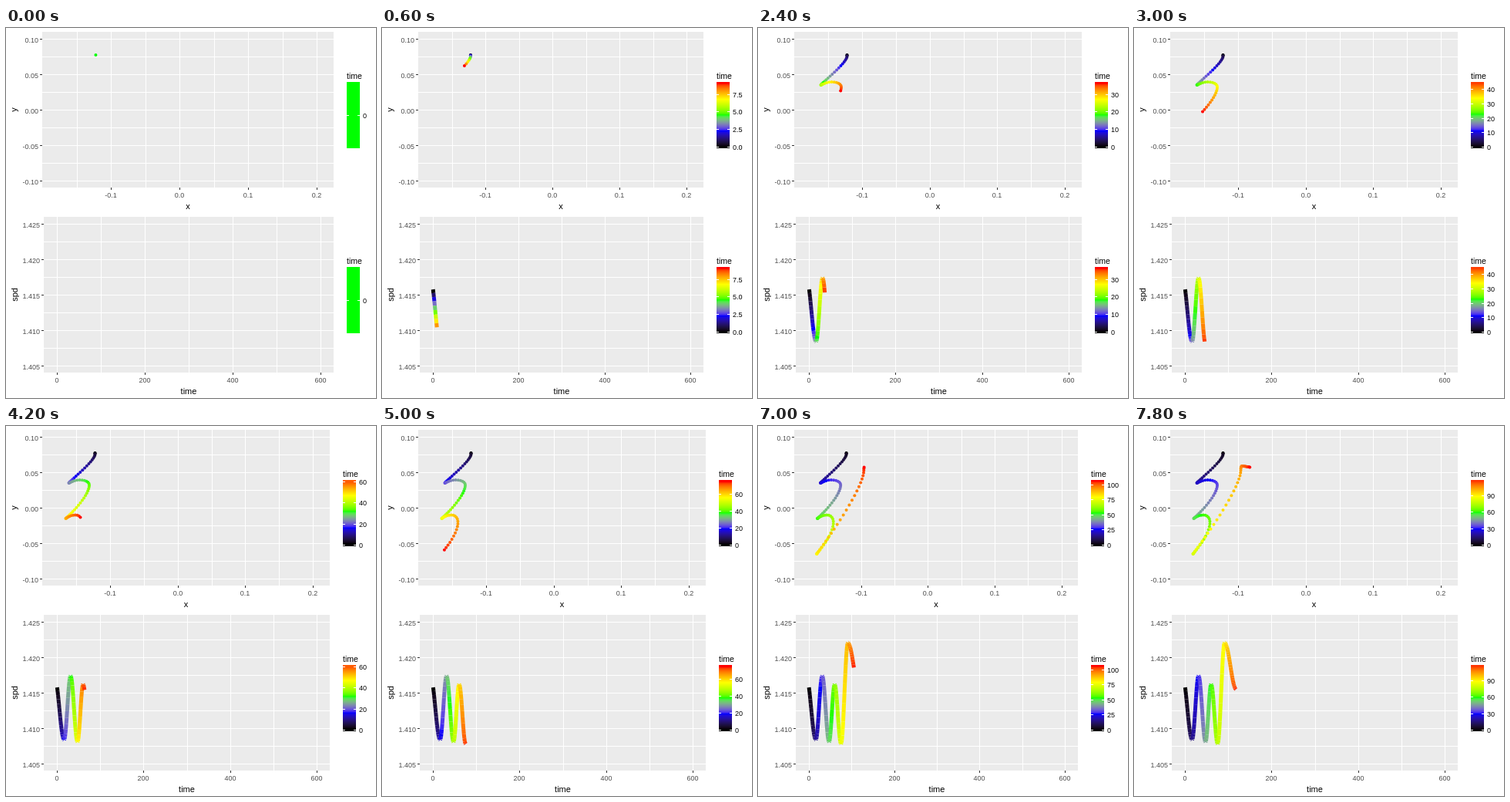
Animation, 480 px wide and 480 px high, one loop 8 s. Source, as an HTML page with a canvas:

```html
<!DOCTYPE html>
<html lang="en">
<head>
<meta charset="utf-8">
<title>Path and speed over time</title>
<style>
  html, body { margin: 0; width: 100%; height: 100%; overflow: hidden; background: #fff; }
  canvas { display: block; width: 100vw; height: 100vh; }
</style>
</head>
<body>
<canvas id="stage" width="480" height="480"></canvas>
<script>
const ctx = document.getElementById('stage').getContext('2d');
const FONT = '"Liberation Sans", Arial, sans-serif';
const STEP_MS = 200, STEPS = 40, TIME_PER_STEP = 3;

// Turning points as [time, pixel]; x is measured in a 373 px wide panel at x = 47.
const X_TURNS = [[3, 115], [21.5, 81], [34, 107.5], [53, 77], [65.5, 98], [79, 76], [103, 138], [122, 152]];
const Y_TURNS = [[0, 35], [22, 74], [28, 70], [53, 120], [60, 115.5], [79, 166], [107, 52], [122, 54]];
const SPEED_TURNS = [[-6, 325], [16, 407], [31, 324], [47, 410], [60, 335], [75, 412.5], [91, 281], [118, 342]];

const clamp = (v, low, high) => Math.min(high, Math.max(low, v));

// Half a cosine wave from each turning point to the next.
function swing(turns, t) {
  const i = Math.max(1, turns.findIndex(([time]) => time >= t));
  const [[t0, v0], [t1, v1]] = [turns[i - 1], turns[i]];
  const u = clamp((t - t0) / (t1 - t0), 0, 1);
  return v0 + (v1 - v0) * (1 - Math.cos(Math.PI * u)) / 2;
}

// Black, blue, green, yellow, red in CIE Lab.
const LAB = [[0, 0, 0], [32.3, 79.2, -107.9], [87.7, -86.2, 83.2], [97.1, -21.6, 94.5], [53.2, 80.1, 67.2]];

function colour(u) {
  const i = Math.min(3, Math.floor(u * 4)), f = u * 4 - i;
  const [L, a, b] = LAB[i].map((v, k) => v + (LAB[i + 1][k] - v) * f);
  const fy = (L + 16) / 116;
  const inv = v => v > 6 / 29 ? v ** 3 : (v - 4 / 29) * 3 * (6 / 29) ** 2;
  const X = 0.9505 * inv(fy + a / 500), Y = inv(fy), Z = 1.089 * inv(fy - b / 200);
  const rgb = [
    3.2406 * X - 1.5372 * Y - 0.4986 * Z,
    -0.9689 * X + 1.8758 * Y + 0.0415 * Z,
    0.0557 * X - 0.204 * Y + 1.057 * Z
  ].map(c => {
    c = clamp(c, 0, 1);
    return Math.round(255 * (c <= 0.0031308 ? 12.92 * c : 1.055 * c ** (1 / 2.4) - 0.055));
  });
  return `rgb(${rgb})`;
}

// Labelled breaks from 0 to max, scored on simplicity, coverage and density.
function breaks(max) {
  if (!max) return [0];
  let best = { score: -Infinity };
  for (let power = 0.1; power <= 100; power *= 10) {
    [1, 5, 2, 2.5, 4, 3].forEach((q, i) => {
      for (let count = 2; count <= 10; count++) {
        const step = q * power, top = step * (count - 1);
        const ratio = Math.max(top, max) / step / 4;
        const score = 0.25 * (1 - i / 5)
          + 0.2 * (1 - 50 * ((max - top) / max) ** 2)
          + 0.5 * (2 - Math.max(ratio, 1 / ratio));
        if (score > best.score) best = { score, step, count };
      }
    });
  }
  return Array.from({ length: best.count }, (_, k) => k * best.step).filter(v => v <= max + 1e-6);
}

// Round step (1, 2, 5 or 10 times a power of ten) that cuts max into about 20 bins.
function binStep(max) {
  const cell = max / 20, base = 10 ** Math.floor(Math.log10(cell));
  let unit = base;
  for (const [factor, bias] of [[2, 1.5], [5, 2.75], [10, 1.5]]) {
    if (factor * base - cell >= bias * (cell - unit)) break;
    unit = factor * base;
  }
  return unit;
}

function rect(fill, x, y, w, h) {
  ctx.fillStyle = fill;
  ctx.fillRect(x, y, w, h);
}

function text(str, x, y, size, fill, align, turn = 0) {
  ctx.save();
  ctx.translate(x, y);
  ctx.rotate(turn);
  ctx.font = `${size}px ${FONT}`;
  ctx.textAlign = align;
  ctx.fillStyle = fill;
  ctx.fillText(str, 0, 0);
  ctx.restore();
}

function panel(left, top, right, xTicks, xMinor, yTicks, xTitle, yTitle, yTitleX) {
  const height = 202, bottom = top + height, width = right - left;
  const px = f => Math.round(left + f * width);
  const py = k => Math.round(top + 9.2 + k * 45.9);
  rect('#ebebeb', left, top, width, height);
  xMinor.forEach(f => rect('#fff', px(f), top, 1, height));
  for (let k = 0; k < 4; k++) rect('#fff', left, py(k + 0.5), width, 1);
  xTicks.forEach(([label, f]) => {
    rect('#fff', px(f), top, 1, height);
    rect('#333', px(f), bottom, 1, 3);
    text(label, px(f), bottom + 13, 9, '#4d4d4d', 'center');
  });
  yTicks.forEach((label, k) => {
    rect('#fff', left, py(k), width, 1);
    rect('#333', left - 3, py(k), 3, 1);
    text(label, left - 5, py(k) + 4.5, 9, '#4d4d4d', 'right');
  });
  text(xTitle, left + width / 2, bottom + 28, 11, '#000', 'center');
  text(yTitle, yTitleX, top + height / 2, 11, '#000', 'center', -Math.PI / 2);
}

function legend(x, top, max, values, labels) {
  const height = 86, step = max ? binStep(max) : 1;
  const bins = Math.floor(max / step + 1e-6), last = bins * step;
  text('time', x, top - 4, 10.5, '#000', 'left');
  for (let y = 0; y < height; y++) {
    const bin = clamp((1 - (y + 0.5) / height) * (bins + 1) - 0.5, 0, bins);
    rect(colour(max ? bin * step / max : 0.5), x, top + y, 17, 1);
  }
  values.forEach((v, i) => {
    const y = Math.round(top + 84 - (max ? v / last : 0.5) * 82);
    rect('#fff', x, y, 3, 1);
    rect('#fff', x + 14, y, 3, 1);
    text(labels[i], x + 21, y + 4, 9, '#000', 'left');
  });
}

const xPlace = v => 0.2355 + (v + 0.1) * 2.3545;
const timePlace = t => 1 / 22 + t / 660;
const PATH_X = ['-0.1', '0.0', '0.1', '0.2'].map(s => [s, xPlace(+s)]);
const PATH_MINOR = [-0.15, -0.05, 0.05, 0.15].map(xPlace);
const PATH_Y = ['0.10', '0.05', '0.00', '-0.05', '-0.10'];
const TIME_X = [0, 200, 400, 600].map(t => [String(t), timePlace(t)]);
const TIME_MINOR = [100, 300, 500].map(timePlace);
const SPEED_Y = ['1.425', '1.420', '1.415', '1.410', '1.405'];

function draw(max) {
  const values = breaks(max);
  const digits = values.some(v => v % 1) ? 1 : 0;
  const labels = values.map(v => v.toFixed(digits));
  ctx.font = `9px ${FONT}`;
  const right = 430 - Math.round(Math.max(...labels.map(s => ctx.measureText(s).width)));
  const shade = t => colour(max ? t / max : 0.5);

  rect('#fff', 0, 0, 480, 480);
  panel(47, 5, right, PATH_X, PATH_MINOR, PATH_Y, 'x', 'y', 14);
  panel(49, 245, right, TIME_X, TIME_MINOR, SPEED_Y, 'time', 'spd', 15);

  const pathX = t => 47.5 + (swing(X_TURNS, t) - 47) / 373 * (right - 47);
  for (let t = 0; t <= max; t++) {
    ctx.fillStyle = shade(t);
    ctx.beginPath();
    ctx.arc(pathX(t), swing(Y_TURNS, t), 2, 0, 2 * Math.PI);
    ctx.fill();
  }

  const timeX = t => 49.5 + timePlace(t) * (right - 49);
  ctx.lineWidth = 5;
  for (let t = 0; t < max; t++) {
    ctx.strokeStyle = shade(t);
    ctx.beginPath();
    ctx.moveTo(timeX(t), swing(SPEED_TURNS, t));
    ctx.lineTo(timeX(t + 1), swing(SPEED_TURNS, t + 1));
    ctx.stroke();
  }

  legend(right + 17, 70, max, values, labels);
  legend(right + 17, 310, max, values, labels);
}

const start = performance.now();
let shown = -1;
function tick() {
  const step = Math.floor((performance.now() - start) / STEP_MS) % STEPS;
  if (step !== shown) draw((shown = step) * TIME_PER_STEP);
  requestAnimationFrame(tick);
}
tick();
</script>
</body>
</html>
```
